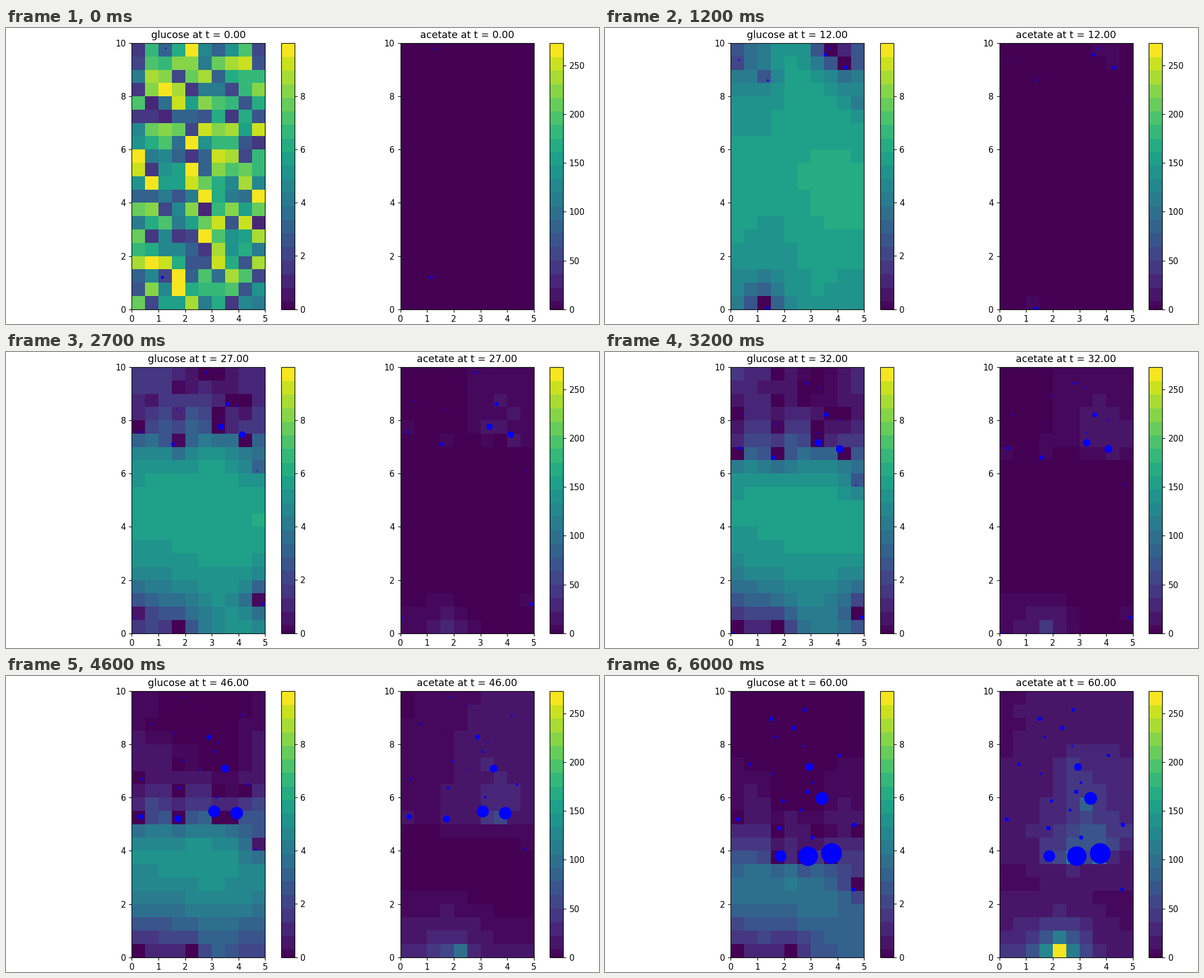
A matplotlib script for the animation above (6100 ms loop, 1058x529 px).

```python
import numpy as np
import matplotlib.pyplot as plt
from matplotlib.animation import FuncAnimation
from matplotlib.colors import ListedColormap

W, H, DPI = 1058, 529, 105.8
FRAMES, INTERVAL = 61, 100
END = FRAMES - 1
GLUCOSE_MAX, ACETATE_MAX = 9.99, 273
CELL, COLS, ROWS = 0.5, 10, 20

DIFFUSION = 0.22
GROWTH = 0.035
FALL = 0.108
UPTAKE, EMISSION = 0.45, 0.055

plt.rcParams["font.family"] = "DejaVu Sans"
rng = np.random.default_rng(7)


class Colony:
    """Sinks at a steady speed, drifts sideways and grows exponentially.

    y and size (pixels across) are those at the end of the run.
    """

    def __init__(self, x_start, x_end, y, size, fall=FALL, since=0, until=END):
        self.x_start, self.x_end = x_start, x_end
        self.y, self.size, self.fall = y, size, fall
        self.entry = max(since, END - (10 - y) / fall)
        self.until = until

    def alive(self, t):
        return self.entry <= t <= self.until

    def at(self, t):
        left = END - t
        drift = left / (END - self.entry)
        x = self.x_end + (self.x_start - self.x_end) * drift
        return x, self.y + self.fall * left, self.size * np.exp(-GROWTH * left)


def small_colonies(count):
    heights = np.linspace(4.5, 9.3, count)
    for y in heights:
        x = rng.triangular(0, 3, 5)
        yield Colony(x + rng.uniform(-0.5, 0.5), x, y, rng.uniform(4, 8.5))


colonies = [
    Colony(1.15, 2.30, -4.8, 45.6, fall=0.1),
    Colony(1.27, 1.87, 3.80, 21, fall=0.1),
    Colony(4.40, 3.78, 3.90, 37),
    Colony(3.60, 2.90, 3.80, 35, fall=0.12),
    Colony(3.70, 3.42, 5.97, 23, fall=0.08),
    Colony(2.80, 2.95, 7.15, 14, fall=0.08),
    Colony(0.30, 0.34, 3.60, 16, fall=0.12, until=56),
    Colony(3.75, 4.63, 4.98, 8),
    Colony(4.80, 4.60, 2.54, 7),
    # settling on the floor at either wall
    Colony(0.05, 0.25, -3.0, 10, since=18),
    Colony(4.93, 4.85, -2.2, 18, fall=0.1, since=20, until=42),
    *small_colonies(15),
]


def diffuse(field):
    p = np.pad(field, 1, mode="edge")
    neighbours = p[:-2, 1:-1] + p[2:, 1:-1] + p[1:-1, :-2] + p[1:-1, 2:]
    return field + DIFFUSION * (neighbours - 4 * field)


def simulate():
    glucose = rng.uniform(1.1, 9.95, (ROWS, COLS))
    acetate = np.zeros((ROWS, COLS))
    history = []
    for t in range(FRAMES):
        dots = np.array([c.at(t) for c in colonies if c.alive(t)])
        if t > 0:
            glucose, acetate = diffuse(glucose), diffuse(acetate)
            for x, y, size in dots:
                # those below the floor still feed on the bottom row
                row = np.clip(int(y / CELL), 0, ROWS - 1)
                col = np.clip(int(x / CELL), 0, COLS - 1)
                glucose[row, col] = max(glucose[row, col] - UPTAKE * size, 0)
                acetate[row, col] += EMISSION * size ** 2
        history.append((glucose, acetate, dots))
    return history


def banded_viridis():
    edges = np.array([0, 0.012, *np.linspace(0.03, 0.947, 19), 1])
    mids = (edges[:-1] + edges[1:]) / 2
    mids[0], mids[-1] = 0, 0.985
    band = np.searchsorted(edges[1:-1], np.linspace(0, 1, 952), side="right")
    return ListedColormap(plt.get_cmap("viridis")(mids[band]))


fig = plt.figure(figsize=(W / DPI, H / DPI), dpi=DPI, facecolor="white")
CMAP = banded_viridis()


def pixel_axes(left, width):
    top, bottom = 27, 502.7
    return fig.add_axes([left / W, 1 - bottom / H, width / W,
                         (bottom - top) / H])


class Panel:
    def __init__(self, name, left, vmax, tick_step):
        self.name = name
        self.ax = pixel_axes(left, 238)
        self.mesh = self.ax.pcolormesh(
            np.linspace(0, 5, COLS + 1), np.linspace(0, 10, ROWS + 1),
            np.zeros((ROWS, COLS)), cmap=CMAP, vmin=0, vmax=vmax)
        self.dots = self.ax.scatter([], [], color="blue", linewidths=0,
                                    zorder=2)
        self.ax.set(xlim=(0, 5), ylim=(0, 10),
                    xticks=range(6), yticks=range(0, 11, 2))
        self.title = self.ax.set_title("")
        bar = fig.colorbar(self.mesh, cax=pixel_axes(left + 266.6, 24))
        bar.set_ticks(np.arange(0, vmax, tick_step))

    def show(self, t, field, dots):
        self.mesh.set_array(field)
        self.dots.set_offsets(dots[:, :2])
        self.dots.set_sizes((dots[:, 2] * 72 / DPI) ** 2)
        self.title.set_text(f"{self.name} at t = {t:.2f}")


panels = [Panel("glucose", 224.4, GLUCOSE_MAX, 2),
          Panel("acetate", 703.7, ACETATE_MAX, 50)]
history = simulate()


def update(t):
    *fields, dots = history[t]
    for panel, field in zip(panels, fields):
        panel.show(t, field, dots)
    return []


anim = FuncAnimation(fig, update, frames=FRAMES, interval=INTERVAL,
                     init_func=lambda: update(0), repeat=True, blit=False)
plt.show()
```
